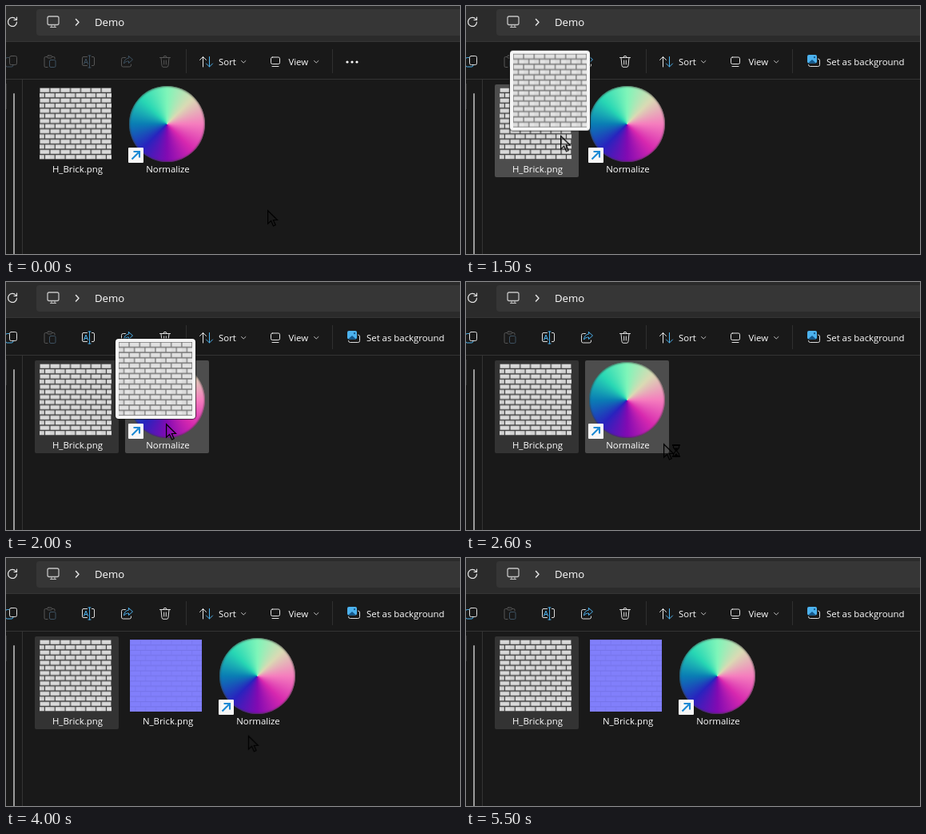
Animation, 568 px wide and 310 px high, one loop 5600 ms. Source, as an HTML page:

```html
<!DOCTYPE html>
<html lang="en">
<head>
<meta charset="utf-8">
<title>Demo folder</title>
<style>
  html, body { margin: 0; width: 100%; height: 100%; overflow: hidden; background: #191919; }
  #stage {
    position: relative; width: 568px; height: 310px; overflow: hidden;
    background: #191919; color: #fff;
    font: 500 11.4px/16px "Open Sans", "Noto Sans", sans-serif;
  }
  #stage > *, .tile > *, #pointer > * { position: absolute; }
  svg { display: block; overflow: visible; }
  text { fill: #fff; }
  .line { fill: none; stroke: currentColor; stroke-linecap: round; stroke-linejoin: round; }
  .accent { stroke: var(--accent); }
  .off { color: #565656; --accent: #3d5161; }
  .on { color: #dedede; --accent: #4cb2ee; }

  .tile { top: 98px; width: 105px; height: 116px; border-radius: 2px; }
  .label { left: 1px; top: 98px; width: 100%; text-align: center; }
  .pic { left: 6px; top: 4px; }
  .disc {
    left: 5px; top: 2px; width: 95px; height: 95px; border-radius: 50%;
    background: conic-gradient(#7ff5b9, #dadab4, #f57dbe, #d728af, #820ab2, #2823be, #0a7db4, #28d7b4, #7ff5b9);
    box-shadow: inset 0 0 2px 1px rgba(60, 60, 60, .7);
  }
  .badge { left: 4px; top: 79px; }
  #ghost {
    left: -63px; top: -106px; width: 100px; height: 100px;
    border-radius: 4px; background: #f6f6f6; box-shadow: 0 0 1px 1px rgba(20, 20, 20, .7);
  }
  #ghost svg { margin: 4px; opacity: .7; }

  /* Everything shares one 5.6 s clock; hard switches use step-end. */
  .idle, .picked, #brick, #normal, #app, #ghost, #wait, #pointer {
    animation: 5.6s step-end infinite;
  }
  .idle { animation-name: idle; }
  .picked { animation-name: picked; }
  #brick { left: 36px; animation-name: brick; }
  #normal { left: 149px; animation-name: normal; }
  #app { left: 149px; animation-name: app; }
  #ghost { animation-name: ghost; }
  #wait { animation-name: wait; }
  #pointer { left: 0; top: 0; animation-name: move, fade; }

  @keyframes idle { 0% { opacity: 1 } 26.785%, 100% { opacity: 0 } }
  @keyframes picked { 0% { opacity: 0 } 26.785%, 100% { opacity: 1 } }
  @keyframes brick {
    0% { background: transparent }
    17.857% { background: #4d4d4d }
    28.571%, 100% { background: #333 }
  }
  @keyframes normal { 0% { opacity: 0 } 67.857%, 100% { opacity: 1 } }
  @keyframes app {
    0% { background: transparent; transform: none }
    32.142% { background: #4d4d4d; transform: none }
    48.214% { background: transparent; transform: none }
    67.857%, 100% { background: transparent; transform: translateX(113px) }
  }
  @keyframes ghost { 0% { opacity: 0 } 26.785% { opacity: 1 } 41.071%, 100% { opacity: 0 } }
  @keyframes wait { 0% { opacity: 0 } 41.071% { opacity: 1 } 62.5%, 100% { opacity: 0 } }
  @keyframes fade { 0% { opacity: 1 } 91.071%, 100% { opacity: 0 } }
  /* The pointer advances ten times a second. */
  @keyframes move {
    0% { transform: translate(327px, 255px) }
    3.571% { transform: translate(327px, 255px); animation-timing-function: steps(8) }
    17.857% { transform: translate(137px, 208px); animation-timing-function: steps(4) }
    25% { transform: translate(100px, 155px); animation-timing-function: steps(3) }
    30.357% { transform: translate(154px, 175px); animation-timing-function: steps(3) }
    35.714% { transform: translate(200px, 177px); animation-timing-function: steps(3) }
    41.071% { transform: translate(206px, 181px) }
    42.857% { transform: translate(206px, 181px); animation-timing-function: steps(2) }
    46.428% { transform: translate(247px, 202px); animation-timing-function: steps(4) }
    53.571% { transform: translate(310px, 221px) }
    67.857% { transform: translate(310px, 221px); animation-timing-function: steps(5) }
    76.785% { transform: translate(292px, 223px) }
    82.142% { transform: translate(292px, 223px); animation-timing-function: steps(5) }
    91.071%, 100% { transform: translate(287px, 244px) }
  }
</style>
</head>
<body>
<div id="stage">
  <svg width="568" height="310">
    <defs>
      <pattern id="bricks" width="12.857" height="12.857" patternUnits="userSpaceOnUse">
        <rect width="12.857" height="12.857" fill="#3c3c3c"/>
        <g fill="#d9d9d9">
          <rect x=".6" y=".7" width="11.6" height="5"/>
          <rect x="-5.8" y="7.1" width="11.6" height="5" fill="#d2d2d2"/>
          <rect x="7" y="7.1" width="11.6" height="5" fill="#dedede"/>
        </g>
      </pattern>
      <pattern id="bumps" width="12.857" height="12.857" patternUnits="userSpaceOnUse">
        <rect width="12.857" height="12.857" fill="#817ffb"/>
        <path d="M0 .4H12.857M0 6.8H12.857" stroke="#706ee0" stroke-width=".8"/>
        <path d="M.4 .8V6.400M6.800 7.200V12.800" stroke="#7775ec" stroke-width=".8"/>
      </pattern>
      <g id="tools" class="line">
        <path class="accent" d="M3.500 64.500H1.500a2 2 0 0 0-2 2V74a2 2 0 0 0 2 2H7a2 2 0 0 0 2-2"/>
        <rect x="4.500" y="62.500" width="9" height="11" rx="2"/>
        <path d="M101.500 63.500h-4.500a1.500 1.500 0 0 0-1.500 1.500v8a1.500 1.500 0 0 0 1.500 1.500h4.500M107.500 63.500h1.500a1.500 1.500 0 0 1 1.500 1.500v8a1.500 1.500 0 0 1-1.500 1.500h-1.500"/>
        <path class="accent" d="M104.500 62v15M103 62h3M103 77h3M97.500 72.500l2.500-6.500 2.500 6.500M98.300 70.500h3.400"/>
        <path d="M149.500 64.500H146.500a2 2 0 0 0-2 2V74a2 2 0 0 0 2 2h8a2 2 0 0 0 2-2V73"/>
        <path class="accent" d="M153.500 62.500l5 4.500-5 4.500V69c-3 0-4.500 1-6 3 .3-4 2.500-6.500 6-7z"/>
        <path d="M192.500 64.500h13M197 64.300a2 2 0 0 1 4 0M194 64.500l1 10a2 2 0 0 0 2 1.800h4a2 2 0 0 0 2-1.800l1-10M197.700 68v5M200.300 68v5"/>
      </g>
    </defs>

    <rect width="568" height="45" fill="#2b2b2b"/>
    <rect x="38" y="4" width="540" height="33" rx="4" fill="#363636"/>
    <path d="M0 44.500H568M0 91.500H568M20.500 92V310" stroke="#343434"/>
    <path d="M225.500 54V84M408.500 54V84" stroke="#303030"/>
    <rect y="97" width="1" height="32" fill="#333"/>
    <rect x="9" y="109" width="2" height="210" rx="1" fill="#9a9a9a"/>

    <g class="line" style="color:#e4e4e4">
      <path d="M12.300 16.500A5.500 5.500 0 1 0 13.500 20M13.500 14v3.500H10" stroke-width="1.200"/>
      <rect x="52" y="13" width="14" height="10.500" rx="2" stroke-width="1.300" style="color:#c4c4c4"/>
      <path d="M57 24v2.500M61 24v2.500M55.500 26.500h7" style="color:#c4c4c4"/>
      <path d="M87.500 16.500l3.500 3.700-3.500 3.700" stroke-width="1.500"/>
      <path d="M246.500 76V63.500M242.500 67.500l4-4 4 4"/>
      <path d="M254.500 63.500V76M250.500 72l4 4 4-4" stroke="#4cb2ee"/>
      <rect x="331.500" y="64" width="11" height="8.500" rx="1.800"/>
      <path d="M333 75.500h8"/>
      <path d="M294.500 68.500l2.700 2.500 2.700-2.500M385.500 68.500l2.700 2.500 2.700-2.500" style="color:#bbb"/>
    </g>
    <text x="111" y="25" font-size="13.200">Demo</text>
    <text x="266" y="74">Sort</text>
    <text x="353.400" y="74">View</text>

    <g class="line off">
      <path d="M51 63.500H49.500a1.500 1.500 0 0 0-1.500 1.500V75a1.500 1.500 0 0 0 1.500 1.500H52M58 63.500h1.500a1.500 1.500 0 0 1 1.500 1.500v1"/>
      <rect x="51.500" y="62" width="6" height="3" rx="1.500"/>
      <rect class="accent" x="54.500" y="67.500" width="7.500" height="9" rx="1.500"/>
    </g>
    <g class="idle">
      <use href="#tools" class="off"/>
      <g fill="#fff">
        <circle cx="427" cy="70" r="1.600"/>
        <circle cx="433" cy="70" r="1.600"/>
        <circle cx="439" cy="70" r="1.600"/>
      </g>
    </g>
    <g class="picked">
      <use href="#tools" class="on"/>
      <path class="line" style="color:#dedede" d="M428.500 73.500a2 2 0 0 0 2 2h10a2 2 0 0 0 2-2V68a2 2 0 0 0-2-2"/>
      <rect x="427" y="61" width="12" height="10.500" rx="2" fill="#4cb2ee"/>
      <path d="M428 71.500l5-4.500 5 4.500z" fill="#15578a"/>
      <circle cx="436" cy="64.200" r="1.100" fill="#15578a"/>
      <text x="451" y="74">Set as background</text>
    </g>
  </svg>

  <div class="tile" id="brick">
    <svg class="pic" width="90" height="90"><rect width="90" height="90" fill="url(#bricks)"/></svg>
    <div class="label">H_Brick.png</div>
  </div>
  <div class="tile" id="normal">
    <svg class="pic" width="90" height="90"><rect width="90" height="90" fill="url(#bumps)"/></svg>
    <div class="label">N_Brick.png</div>
  </div>
  <div class="tile" id="app">
    <div class="disc"></div>
    <svg class="badge" width="19" height="19">
      <rect width="19" height="19" rx="1" fill="#f7f7f7"/>
      <path d="M4.500 14.500L13.500 5.500M6.500 5H14V12.500" fill="none" stroke="#1c8ad4" stroke-width="2.100"/>
    </svg>
    <div class="label">Normalize</div>
  </div>

  <div id="pointer">
    <div id="ghost">
      <svg width="92" height="92" viewBox="0 0 90 90"><rect width="90" height="90" fill="url(#bricks)"/></svg>
    </div>
    <svg width="24" height="20" fill="none" stroke="#000" stroke-width="1.200">
      <path d="M.600 .800V17.200L4.600 13.600l2.900 6.400 2.700-1.200L7.400 12.500H12.500z"/>
      <g id="wait">
        <path d="M11 2h10M11 16h10" stroke-width="1.800"/>
        <path d="M12.500 2v3l3 4-3 4v3M19.500 2v3l-3 4 3 4v3"/>
        <path d="M13.500 5.500h5L16 8.500zM13.500 15l2.500-3 2.500 3z" fill="#000" stroke="none"/>
      </g>
    </svg>
  </div>
</div>
</body>
</html>
```
